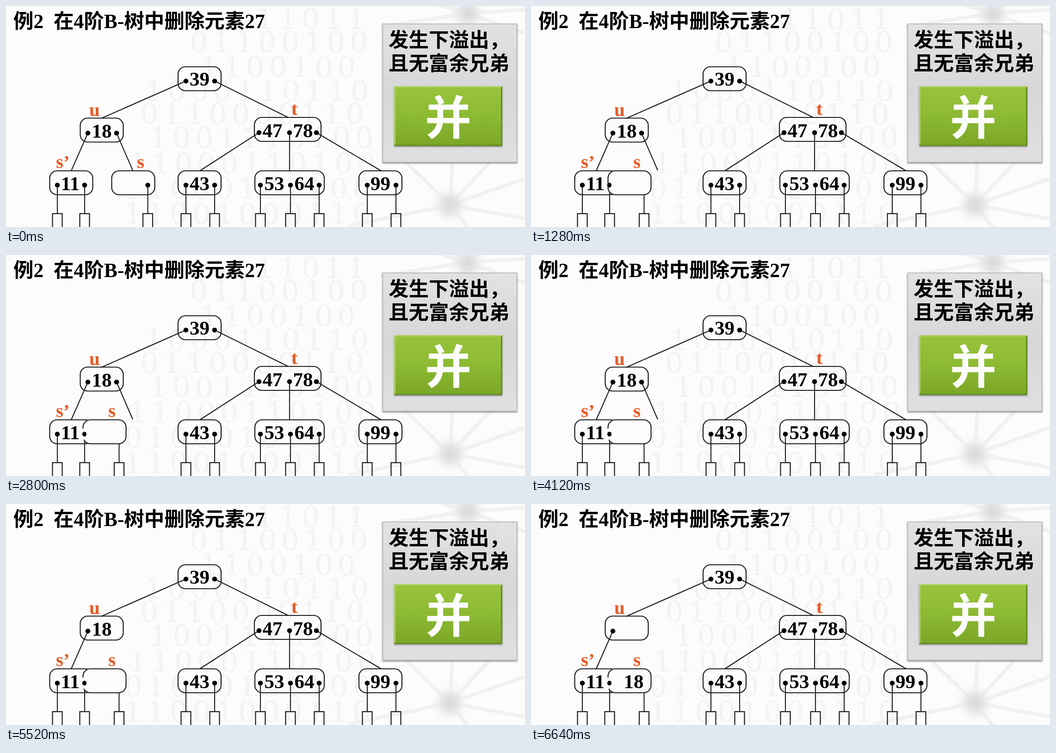
Recreate the animation shown at these times as an HTML page. Size 1122 by 480 pixels, loop 6680 ms.

```html
<!DOCTYPE html>
<html lang="zh-CN">
<head>
<meta charset="utf-8">
<title>B-树删除</title>
<style>
  html, body { margin: 0; width: 100%; height: 100%; overflow: hidden; background: #fcfcfc; }
  svg { display: block; width: 1122px; height: 480px; }
  text { font: bold 43px "Liberation Serif", "Noto Sans CJK SC", "Noto Sans CJK", serif; white-space: pre; }
  .cjk { font-family: "Noto Sans CJK SC", "Noto Sans CJK", sans-serif; font-size: 43.5px; }
  .mid { text-anchor: middle; }
  .label { font-size: 41px; fill: #e85a24; }
  .line { fill: none; stroke: #1c1c1c; stroke-width: 2.1; }
  .box { fill: none; stroke: #1c1c1c; stroke-width: 2.2; }
  .solid { fill: #fcfcfc; }
  .digits text { font: 62px "DejaVu Serif", serif; letter-spacing: 10px; fill: #f3f3f4; }
  .web { stroke: #f1f1f2; stroke-width: 8; fill: none; }
</style>
</head>
<body>
<svg viewBox="0 0 1122 480">
  <defs>
    <radialGradient id="glow">
      <stop offset="0" stop-color="#d9d9dc"/>
      <stop offset=".4" stop-color="#e4e4e6"/>
      <stop offset="1" stop-color="#f4f4f5" stop-opacity="0"/>
    </radialGradient>
    <linearGradient id="panel" x2="0" y2="1">
      <stop offset="0" stop-color="#e2e2e4"/>
      <stop offset=".5" stop-color="#d7d7d9"/>
      <stop offset="1" stop-color="#e0e0e2"/>
    </linearGradient>
    <linearGradient id="green" x2="0" y2="1">
      <stop offset="0" stop-color="#98c43c"/>
      <stop offset=".5" stop-color="#8cba32"/>
      <stop offset="1" stop-color="#7ba628"/>
    </linearGradient>
    <filter id="shade" x="-10%" y="-10%" width="120%" height="120%">
      <feDropShadow dx="0" dy="2" stdDeviation="1.5" flood-color="#444" flood-opacity=".6"/>
    </filter>
  </defs>
  <g id="back"></g>
  <rect x="814.5" y="39" width="290" height="300" fill="url(#panel)" stroke="#bdbdbf" stroke-width="2" filter="url(#shade)"/>
  <rect x="839" y="174" width="234" height="130" fill="url(#green)" filter="url(#shade)"/>
  <path d="M840.500 303V175.500H1072" fill="none" stroke="#b0d266" stroke-width="3"/>
  <path d="M840 302.500H1071.500V176" fill="none" stroke="#688f20" stroke-width="3"/>
  <text class="cjk" x="827" y="89">发生下溢出，</text>
  <text class="cjk" x="827" y="140">且无富余兄弟</text>
  <text class="cjk mid" x="956" y="279" style="font-size:100px" fill="#fcfcfa">并</text>
  <text x="16" y="48" style="font-size:43.5px">例2  在4阶B-树中删除元素27</text>
  <g id="tree"></g>
  <g id="sibling"></g>
  <path id="gap" d="M166.500 377V402" stroke="#fcfcfc" stroke-width="4"/>
  <ellipse cx="169.500" cy="389" rx="4.5" ry="5.3"/>
  <text id="key" class="mid" x="207" y="286">18</text>
</svg>
<script>
const LOOP = 6680;
const $ = id => document.getElementById(id);
const line = (x1, y1, x2, y2, cls = "line") => `<path class="${cls}" d="M${x1} ${y1}L${x2} ${y2}"/>`;
const dot = (x, y) => `<circle cx="${x}" cy="${y}" r="5.3"/>`;
const box = (x, y, w, cls = "") => `<rect class="box ${cls}" x="${x}" y="${y}" width="${w}" height="52" rx="16"/>`;
const text = (s, x, y, cls = "mid") => `<text class="${cls}" x="${x}" y="${y}">${s}</text>`;
const leg = x => line(x, 389, x, 451) + `<rect class="box" x="${x - 10.5}" y="451" width="21" height="40"/>`;

// Faint backdrop: rows of binary digits and a web of links
const rows = [
  [540, 50, "11011"], [397, 100, "01100100"], [420, 154, "1100100"],
  [300, 206, "1000110110"], [290, 256, "0110000110"], [310, 308, "1001110100"],
  [265, 364, "11000110100"], [255, 418, "01000101100"], [255, 473, "11001000110"]
];
const hub = (x, y, ends) => ends.map(([a, b]) => line(x, y, a, b, "web")).join("") +
  `<circle cx="${x}" cy="${y}" r="42" fill="url(#glow)"/>`;
$("back").innerHTML =
  `<g class="digits">${rows.map(([x, y, s]) => text(s, x, y, "")).join("")}</g>` +
  hub(960, 432, [[845, 320], [965, 330], [1050, 335], [1122, 375], [1122, 462], [1005, 490], [740, 478]]) +
  hub(998, 16, [[810, 45], [930, -5], [1122, 8], [1122, 60], [1010, 80]]);

const leaf = (x, w, dots) => box(x, 358, w) + dots.map(d => leg(d) + dot(d, 389)).join("");
$("tree").innerHTML =
  line(389, 163, 206, 244) + line(451, 163, 610, 242) + line(177, 276, 141, 358) +
  line(547, 275, 419, 358) + line(613, 275, 613, 358) + line(671, 275, 811, 358) +
  box(372, 132, 93) + box(160.5, 243.500, 93) + box(537, 242, 144) +
  [[389, 163], [451, 163], [177, 276], [547, 275], [613, 275], [671, 275]].map(p => dot(...p)).join("") +
  `<g id="link">${line(239, 276, 274, 357)}${dot(239, 276)}</g>` +
  leaf(94.500, 93, [111, 170]) + leaf(372, 93, [389, 451]) +
  leaf(538, 150, [550, 615, 677]) + leaf(763, 93, [781, 843]) +
  [["39", 418.500, 173], ["47", 576, 285], ["78", 642, 285], ["11", 139, 400], ["43", 418.500, 400],
   ["53", 580, 400], ["64", 645, 400], ["99", 809.500, 400]].map(a => text(...a)).join("") +
  text("u", 191.500, 239, "label mid") + text("t", 623.500, 237, "label mid") + text("s’", 108, 352, "label");

$("sibling").innerHTML = leg(306.500) + box(228.500, 358, 93, "solid") +
  `<g id="end">${line(306.500, 389, 306.500, 411)}${dot(306.500, 389)}</g>` +
  text("s", 291, 352, "label mid");

// Smooth 0..1 progress between two times
const ease = (t, from, to) => {
  const p = Math.min(1, Math.max(0, (t - from) / (to - from)));
  return (1 - Math.cos(Math.PI * p)) / 2;
};
const show = (id, on) => $(id).setAttribute("visibility", on ? "visible" : "hidden");
const move = (id, x, y) => $(id).setAttribute("transform", `translate(${x} ${y})`);

const start = performance.now();
function frame() {
  const t = (performance.now() - start) % LOOP;
  const rise = ease(t, 5640, 6480);
  move("sibling", -62 * ease(t, 420, 1250), 0);
  show("end", t < 1250);
  show("gap", t >= 1320);
  show("link", t < 4800);
  move("key", 15 * rise, 114 * rise);
  requestAnimationFrame(frame);
}
frame();
</script>
</body>
</html>
```
